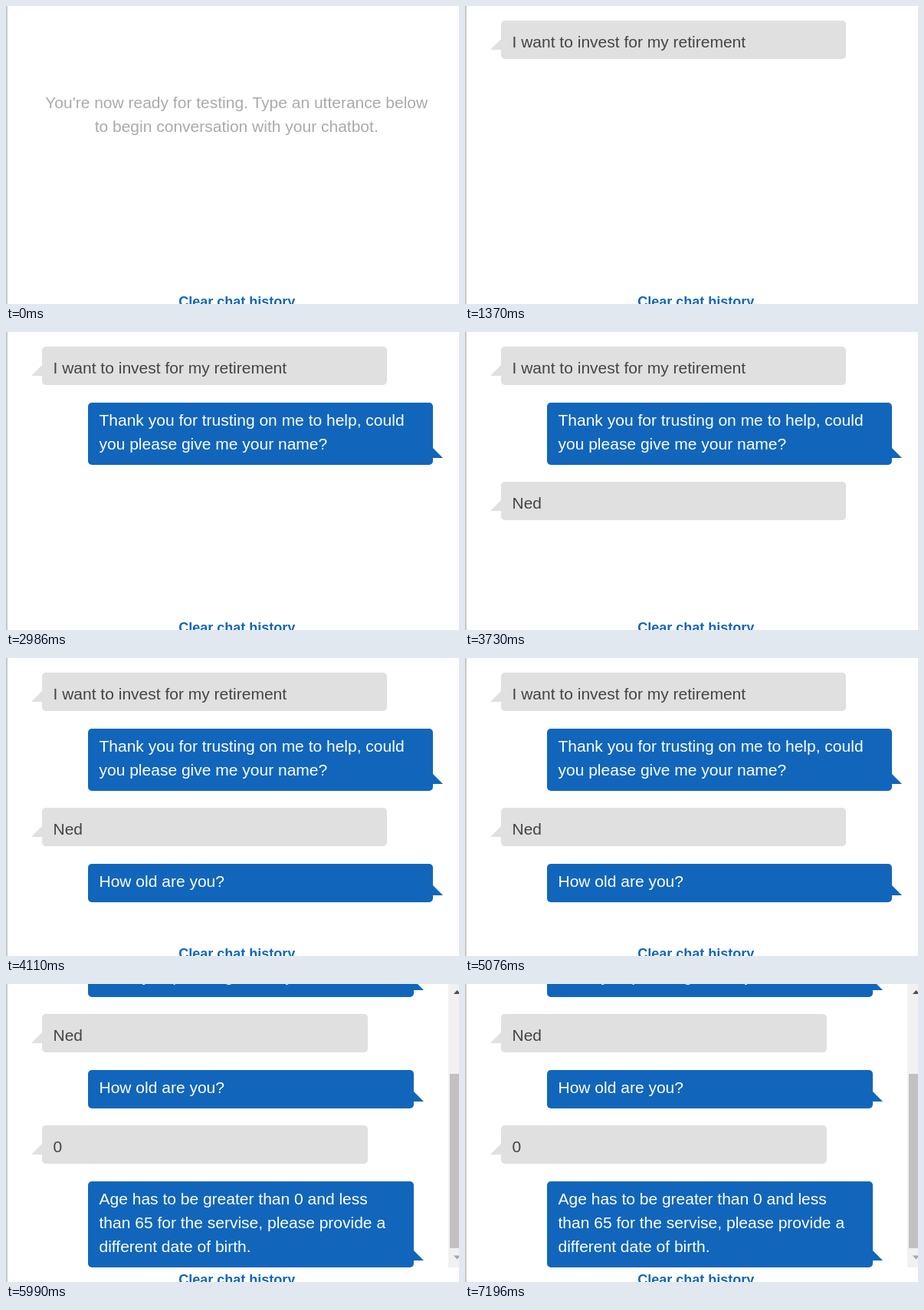
Recreate the animation shown at these times as an HTML page. Size 591 by 388 pixels, loop 8 s.

```html
<!DOCTYPE html>
<html lang="en">
<head>
<meta charset="utf-8">
<title>Chatbot test</title>
<style>
  html, body { margin: 0; width: 591px; height: 388px; overflow: hidden; background: #fff; }
  svg { display: block; font: 21px "Liberation Sans", Arial, sans-serif; }
  .user { fill: #e0e0e0; }
  .bot { fill: #1166bb; }
  .user text { fill: #444; }
  .bot text { fill: #fff; }
  .hint { fill: #aaa; text-anchor: middle; }
  .clear { fill: #1166bb; font-size: 18px; font-weight: bold; text-anchor: middle; }
</style>
</head>
<body>
<svg width="591" height="388" viewBox="0 0 591 388">
  <clipPath id="view"><rect width="591" height="369"/></clipPath>
  <rect width="2" height="388" fill="#c8c8c8"/>
  <text class="clear" x="301.2" y="391">Clear chat history</text>
  <g id="hint" class="hint">
    <text x="300.7" y="133">You're now ready for testing. Type an utterance below</text>
    <text x="300.7" y="164">to begin conversation with your chatbot.</text>
  </g>
  <g clip-path="url(#view)"><g id="log"></g></g>
  <g id="bar">
    <rect x="577" width="14" height="369" fill="#f1f1f1"/>
    <rect id="thumb" x="579" width="12" fill="#c1c1c1"/>
    <path d="M584 13L588.5 8L593 13Z" fill="#505050"/>
    <path d="M584 353.500L588.5 358.500L593 353.500Z" fill="#a3a3b8"/>
  </g>
</svg>
<script>
const LOOP = 8000, LINE = 31;
const $ = id => document.getElementById(id);

// Text breaks at "|" in the wide log and at "/" once the scrollbar narrows it.
const messages = [
  { who: "user", y: 19, text: "I want to invest for my retirement" },
  { who: "bot", y: 92, text: "Thank you for trusting on me to help,/ could| you please give me your name?" },
  { who: "user", y: 195, text: "Ned" },
  { who: "bot", y: 268, text: "How old are you?" },
  { who: "user", y: 340, text: "0" },
  { who: "bot", y: 413, text: "Age has to be greater than 0 and less/ than 65 for the servise, please provide a/ different date of birth." }
];
const states = [
  { at: 0, count: 0, scroll: 0 },
  { at: 1370, count: 1, scroll: 0 },
  { at: 1870, count: 2, scroll: 0 },
  { at: 3730, count: 3, scroll: 0 },
  { at: 4110, count: 4, scroll: 0 },
  { at: 5720, count: 5, scroll: 21, thumb: 39 },
  { at: 5990, count: 6, scroll: 156, thumb: 117 }
];

function bubble({ who, y, text }, narrow) {
  const user = who === "user", x = user ? 47 : 107, width = narrow ? 425 : 450;
  const lines = text.replaceAll(narrow ? "|" : "/", "").split(narrow ? "/" : "|");
  const height = 50 + LINE * (lines.length - 1), right = x + width;
  const foot = y + height - (user ? 12 : 9);
  const tail = user ? `M${x} ${foot - 14}V${foot}H${x - 14}Z`
                    : `M${right} ${foot - 13}V${foot}H${right + 13}Z`;
  const rows = lines.map((line, i) =>
    `<text x="${x + 14.5}" y="${y + (user ? 35 : 30) + i * LINE}">${line.trim()}</text>`);
  return `<g class="${who}"><rect x="${x}" y="${y}" width="${width}" height="${height}" rx="5"/>
    <path d="${tail}"/>${rows.join("")}</g>`;
}

let shown;
function draw(now) {
  const state = states.findLast(s => s.at <= now % LOOP);
  if (state !== shown) {
    shown = state;
    const { count, scroll, thumb } = state;
    $("hint").style.display = count ? "none" : "";
    $("bar").style.display = thumb ? "" : "none";
    if (thumb) {
      $("thumb").setAttribute("y", thumb);
      $("thumb").setAttribute("height", 344 - thumb);
    }
    $("log").innerHTML = messages.slice(0, count).map(m => bubble(m, thumb)).join("");
    $("log").setAttribute("transform", `translate(0 ${-scroll})`);
  }
  requestAnimationFrame(draw);
}
draw(performance.now());
</script>
</body>
</html>
```
